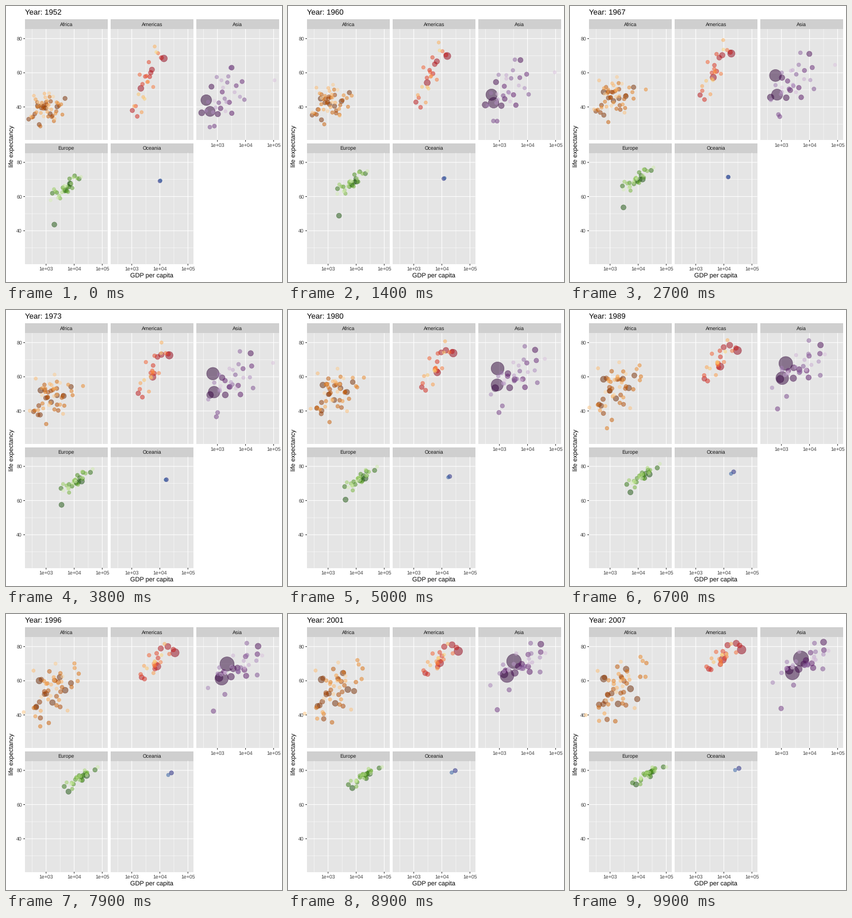
These frames come from a looping animation (480x480 px, 10 s). A matplotlib script:

```python
import numpy as np
import matplotlib.pyplot as plt
from matplotlib.animation import FuncAnimation
from matplotlib.colors import LinearSegmentedColormap, to_rgb
from matplotlib.patches import Rectangle

FRAMES, INTERVAL = 100, 100
PX = 0.75  # points per pixel at 96 dpi
LEFT, TOP, COL, ROW = 33.0, 40.2, 149.0, 215.3
WIDTH, HEIGHT, STRIP = 143.6, 193.0, 16.8
LOG_MIN, LOG_SPAN = 2.2484, 2.9403
LIFE_MAX, LIFE_SPAN = 85.55, 64.95
POP_MAX = 1318.7
KEY_YEARS = (1952, 1962, 1977, 1992, 2007)

plt.rcParams.update({"font.family": "Liberation Sans", "text.hinting": "none"})

rng = np.random.default_rng(7)
progress = np.linspace(0, 1, FRAMES)
years = 1952 + 55 * progress


def ramp(start, end):
    return start + (end - start) * progress


def drift(n, turn):
    """Evenly spread deviations of n dots that slowly trade places."""
    u = np.linspace(-1, 1, n)
    z = 1.2 * u + 0.8 * u ** 3
    a, b = rng.permutation(z)[:, None], rng.permutation(z)[:, None]
    return a * np.cos(turn * progress) + b * np.sin(turn * progress)


class Continent:
    """Dots ranked by population; wealth is log10 of GDP per capita."""

    def __init__(self, name, slot, colors, n, tail, lead=(), growth=2.4):
        self.name, self.n, self.growth = name, n, growth
        self.x, self.y = LEFT + COL * (slot % 3), TOP + ROW * (slot // 3)
        rank = np.linspace(0, 1, n - len(lead))
        self.pop = np.append(lead, tail * np.exp(-4.2 * rank ** 0.7))
        self.wealth, self.life = np.zeros((2, n, FRAMES))
        tones = [np.array(to_rgb("#" + c)) ** 1.3 for c in colors.split()]
        cmap = LinearSegmentedColormap.from_list(name, tones)
        self.colors = cmap(np.linspace(0, 1, n))

    def cloud(self, wealth, life, wealth_sd, life_sd, corr):
        """Scatter all dots around a moving mean."""
        z, e, r = drift(self.n, 0.5), drift(self.n, 0.9), ramp(*corr)
        self.wealth = np.interp(years, KEY_YEARS, wealth) + ramp(*wealth_sd) * z
        self.life = (np.interp(years, KEY_YEARS, life)
                     + ramp(*life_sd) * (r * z + np.sqrt(1 - r * r) * e))
        self.life = np.minimum(self.life, 82)

    def pin(self, rank, *points):
        """Lead one dot through (year, GDP, life) points."""
        t, gdp, life = zip(*points)
        self.wealth[rank] = np.interp(years, t, np.log10(gdp))
        self.life[rank] = np.interp(years, t, life)

    def px(self, wealth):
        return self.x + (wealth - LOG_MIN) / LOG_SPAN * WIDTH

    def py(self, life):
        return self.y + (LIFE_MAX - life) / LIFE_SPAN * HEIGHT

    def paths(self):
        return np.stack([self.px(self.wealth), self.py(self.life)], axis=-1)

    def diameters(self):
        first, last = (2 + 10 * np.sqrt(p / POP_MAX)
                       for p in (self.pop / self.growth, self.pop))
        size = first + np.outer(progress, last - first)
        return 0.75 * (size * 2.845 + 0.94)


africa = Continent("Africa", 0, "7F3B08 B35806 E08214 FDB863 FEE0B6",
                   52, tail=135, growth=3.6)
africa.cloud(wealth=(2.98, 3.06, 3.2, 3.18, 3.25),
             life=(39.1, 43.3, 49.6, 53.6, 54.8),
             wealth_sd=(0.30, 0.45), life_sd=(5, 9.5), corr=(0.3, 0.6))
africa.pin(4, (1952, 4725, 45), (1972, 7766, 53.7), (1992, 7225, 61.9),
           (2007, 9270, 49.3))
africa.pin(28, (1952, 493, 40), (1982, 882, 46.2), (1992, 737, 23.6),
           (1997, 590, 36.1), (2007, 863, 46.2))
africa.pin(32, (1952, 2388, 42.7), (1967, 18773, 50.2), (1977, 21951, 57.4),
           (1992, 9641, 68.8), (2007, 12057, 74))

americas = Continent("Americas", 1, "A50026 D73027 F46D43 FDAE61 FEE090",
                     25, tail=109, lead=(301, 190), growth=2.2)
americas.cloud(wealth=(3.48, 3.56, 3.75, 3.77, 3.9),
               life=(53.3, 58.4, 64.4, 69.6, 73.6),
               wealth_sd=(0.23, 0.29), life_sd=(9, 4.2), corr=(0.7, 0.75))
americas.pin(0, (1952, 13990, 68.4), (1962, 16173, 70.2), (1977, 24073, 73.4),
             (2007, 42952, 78.2))
americas.pin(1, (1952, 2109, 50.9), (1977, 6660, 61.5), (2007, 9066, 72.4))
americas.pin(5, (1952, 11367, 68.8), (1977, 22091, 74.2), (2007, 36319, 80.7))

asia = Continent("Asia", 2, "40004B 762A83 9970AB C2A5CF E7D4E8",
                 33, tail=223, lead=(1318.7, 1110))
asia.cloud(wealth=(3.2, 3.28, 3.55, 3.64, 3.8),
           life=(46.3, 51.6, 59.6, 66.5, 70.7),
           wealth_sd=(0.38, 0.58), life_sd=(9, 6.5), corr=(0.6, 0.8))
asia.pin(0, (1952, 400, 44), (1957, 576, 50.5), (1962, 488, 44.5),
         (1967, 613, 58.4), (1977, 741, 64), (1992, 1656, 68.7), (2007, 4959, 73))
asia.pin(1, (1952, 547, 37.4), (1967, 701, 47.2), (1982, 856, 56.6),
         (1992, 1164, 60.2), (2007, 2452, 64.7))
asia.pin(5, (1952, 3217, 63), (1962, 6577, 68.7), (1972, 14779, 73.4),
         (1992, 26825, 79.4), (2007, 31656, 82.6))
asia.pin(12, (1952, 779, 28.8), (1982, 978, 39.9), (1992, 649, 41.7),
         (2007, 975, 43.8))
asia.pin(31, (1952, 108382, 55.6), (1967, 80895, 64.6), (1972, 109348, 67.7),
         (1982, 31354, 71.3), (2007, 47307, 77.6))

europe = Continent("Europe", 3, "276419 4D9221 7FBC41 B8E186 E6F5D0",
                   30, tail=82, growth=1.35)
europe.cloud(wealth=(3.7, 3.87, 4.12, 4.14, 4.35),
             life=(65.3, 69.2, 72.2, 74.7, 77.8),
             wealth_sd=(0.27, 0.24), life_sd=(3.8, 2.8), corr=(0.85, 0.85))
europe.pin(0, (1952, 7144, 67.5), (1972, 18016, 71), (1992, 26505, 76.1),
           (2007, 32170, 79.4))
europe.pin(1, (1952, 1969, 43.6), (1972, 3451, 57), (1992, 5678, 66.1),
           (2007, 8458, 71.8))

oceania = Continent("Oceania", 4, "313695 4575B4", 2, tail=4.1, lead=(20.4,))
oceania.pin(0, (1952, 10040, 69.1), (1962, 12217, 70.9), (1972, 16789, 71.9),
            (1992, 23425, 77.6), (2007, 34435, 81.2))
oceania.pin(1, (1952, 10557, 69.4), (1962, 13176, 71.2), (1972, 16046, 71.9),
            (1992, 18363, 76.3), (2007, 25185, 80.2))

continents = [africa, americas, asia, europe, oceania]

fig = plt.figure(figsize=(5, 5), dpi=96, facecolor="white")
ax = fig.add_axes([0, 0, 1, 1])
ax.set(xlim=(0, 480), ylim=(480, 0))
ax.axis("off")


def label(x, y, text, size, color="black", ha="center", **kw):
    return ax.text(x, y, text, size=size * PX, color=color, ha=ha,
                   va="baseline", **kw)


def line(xs, ys, color="white", width=1.07):
    ax.plot(xs, ys, color=color, lw=width * PX, solid_capstyle="butt",
            snap=False, zorder=2)


def box(x, y, w, h, color):
    ax.add_patch(Rectangle((x, y), w, h, color=color, lw=0))


def draw_panel(c):
    right, bottom = c.x + WIDTH, c.y + HEIGHT
    box(c.x, c.y - STRIP, WIDTH, STRIP, "#CFCFCF")
    box(c.x, c.y, WIDTH, HEIGHT, "#E5E5E5")
    label(c.x + WIDTH / 2, c.y - 5.2, c.name, 8.8, "#151515")
    for power in (2.5, 3.5, 4.5, 3, 4, 5):
        x = c.px(power)
        major = power == int(power)
        line([x, x], [c.y, bottom], width=1.07 if major else 0.53)
        if major and c.name in ("Asia", "Europe", "Oceania"):
            line([x, x], [bottom, bottom + 2.75], "#2A2A2A")
            label(x, bottom + 11.4, f"1e+0{power}", 8.8, "#404040")
    for life in (30, 50, 70, 40, 60, 80):
        y = c.py(life)
        major = life % 20 == 0
        line([c.x, right], [y, y], width=1.07 if major else 0.53)
        if major and c.x == LEFT:
            line([c.x - 2.75, c.x], [y, y], "#2A2A2A")
            label(c.x - 5, y + 3.2, life, 8.8, "#404040", "right")


for c in continents:
    draw_panel(c)
label(253.8, 473, "GDP per capita", 11)
label(14, 244, "life expectancy", 11, rotation=90, rotation_mode="anchor")
title = label(33, 15, "", 13.2, ha="left")

paths = np.concatenate([c.paths() for c in continents])
areas = np.hstack([(c.diameters() * PX) ** 2 for c in continents])
colors = np.vstack([c.colors for c in continents])
colors[:, 3] = 0.5
dots = ax.scatter(*paths[:, 0].T, s=areas[0], facecolors=colors,
                  edgecolors=colors, linewidths=0.71 * PX, zorder=3)


def update(i):
    dots.set_offsets(paths[:, i])
    dots.set_sizes(areas[i])
    title.set_text(f"Year: {years[i]:.0f}")
    return dots, title


anim = FuncAnimation(fig, update, frames=FRAMES, interval=INTERVAL, repeat=True)
plt.show()
```
